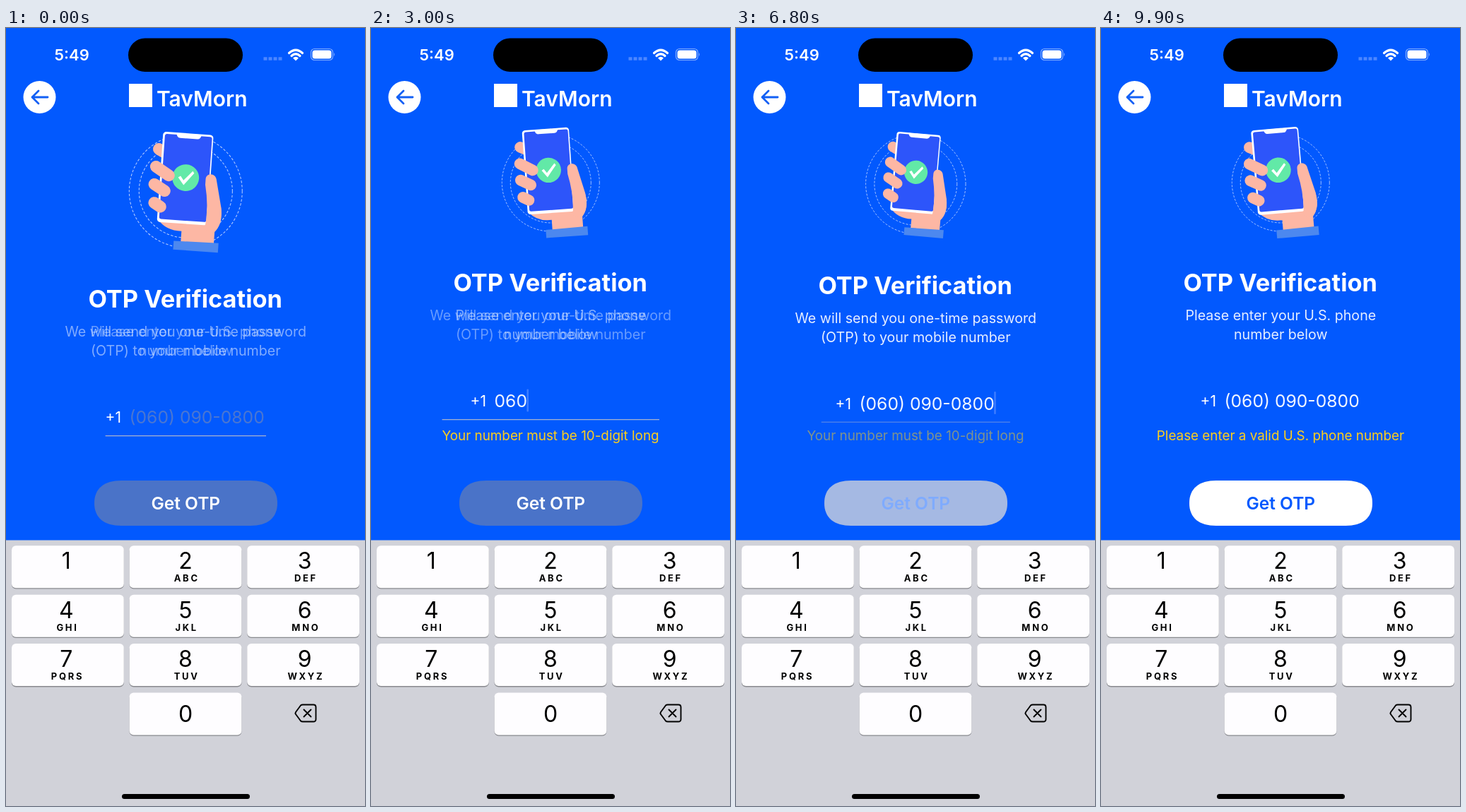
An HTML page for the animation above (10000 ms loop, 508 px wide and 1102 px high).

```html
<!DOCTYPE html>
<html lang="en">
<head>
<meta charset="utf-8">
<title>OTP Verification</title>
<style>
  html, body { margin: 0; width: 100%; height: 100%; overflow: hidden; background: #0259fe; }
  svg { display: block; width: 100%; height: 100%; font-family: Inter, Roboto, sans-serif; fill: #fff; }
  .mid { text-anchor: middle; }
  .semi { font-weight: 600; }
  .desc { font-size: 19.65px; fill: #e6eeff; }
  .err { font-size: 18.85px; fill: #ffcf1a; }
  .skin { fill: none; stroke: #fdb7a4; stroke-linecap: round; }
  .line { fill: none; stroke-linecap: round; stroke-linejoin: round; }
  .ring { fill: none; stroke: #b4ccff; stroke-width: .9; stroke-dasharray: 3 2; }
  #keys { fill: #000; }
</style>
</head>
<body>
<svg viewBox="0 0 508 1102">
  <defs>
    <path id="pill" d="M125 673C125 652 139 641 163 641H346C370 641 384 652 384 673S370 705 346 705H163C139 705 125 694 125 673Z"/>
  </defs>
  <rect width="508" height="1102" fill="#0259fe"/>

  <!-- status bar -->
  <text class="semi" x="68.500" y="46" font-size="22">5:49</text>
  <rect x="173" y="14.500" width="162" height="47.500" rx="23.700" fill="#000"/>
  <path d="M364.500 43.500h26" stroke="#4d87ff" stroke-width="4.500" stroke-dasharray="5 2"/>
  <path class="line" d="M400.500 35.500Q410 27 419.500 35.500M404 39.500Q410 34 416 39.500" stroke="#fff" stroke-width="3.200"/>
  <path d="M406 42.500Q410 39 414 42.500L410 46.500Z"/>
  <rect x="431.500" y="29.500" width="31" height="16" rx="5" fill="none" stroke="#80abff" stroke-width="1.200"/>
  <rect x="433.500" y="31.500" width="27" height="12" rx="3.500"/>
  <path d="M464 35q2 2.500 0 5z" fill="#80abff"/>

  <!-- header -->
  <circle cx="47.500" cy="98" r="23"/>
  <path class="line" d="M59 98H37M46 89L37 98L46 107" stroke="#1260f5" stroke-width="2.800"/>
  <rect x="174" y="79" width="33" height="33"/>
  <text class="semi" x="213" y="111" font-size="30">TavMorn</text>

  <!-- illustration, drawn around the ring centre -->
  <g id="art">
    <circle class="ring" r="69"/>
    <circle class="ring" r="57"/>
    <g id="hand">
      <path class="skin" d="M-38 -51L-20 -42" stroke-width="15"/>
      <path d="M-33 38Q-22 52 -2 51V66H40V49Q50 38 46 18L30 -10Z" fill="#fdb7a4"/>
      <rect x="-34" y="-73.500" width="64" height="115" rx="4"/>
      <rect x="-31.500" y="-71" width="60" height="108.500" rx="2.500" fill="#2d55fa"/>
      <path d="M-17 -73h32q-1 6-5 6h-22q-4 0-5-6z"/>
      <circle cx="-1.500" cy="-17" r="17" fill="#62e9a7"/>
      <path d="M-11 -17L-3.500 -7.500L9 -23.500L7 -26L-4 -13.500L-8 -19Z"/>
      <path d="M24 -17C24 -26 37 -26 38 -16L46 17Q50 40 38 51L27 47Q31 20 24 -10Z" fill="#fdb7a4"/>
      <path class="skin" d="M-40 -28.500L-23 -18.500M-40.500 -6L-27 1.500M-39 17.500L-31 22" stroke-width="15"/>
      <path d="M-11 64L46 63V75H-11Z" fill="#4c88ef"/>
    </g>
  </g>

  <g id="body">
    <text class="mid" x="253.700" y="373" font-size="34.400" font-weight="700">OTP Verification</text>
    <g id="descA" class="mid desc"><text x="254.300" y="414">We will send you one-time password</text><text x="254.300" y="441">(OTP) to your mobile number</text></g>
    <g id="descB" class="mid desc"><text x="254.300" y="414">Please enter your U.S. phone</text><text x="254.300" y="441">number below</text></g>
    <text x="140.500" y="536" font-size="21">+1</text>
    <text id="number" x="174.500" y="537" font-size="24.700"></text>
    <rect id="caret" y="511.500" width="2.500" height="32" rx="1" fill="#3f7dff"/>
    <rect id="rule" y="554" height="1.300" fill="#a3afd0"/>
  </g>
  <text id="errA" class="mid err" x="254" y="584">Your number must be 10-digit long</text>
  <text id="errB" class="mid err" x="254" y="584">Please enter a valid U.S. phone number</text>

  <!-- button -->
  <g class="mid semi" font-size="24.500">
    <use href="#pill" fill="#4a73c8"/>
    <text x="254.300" y="682">Get OTP</text>
    <g id="ready">
      <use href="#pill"/>
      <text x="254.300" y="682" fill="#0259fe">Get OTP</text>
    </g>
  </g>

  <!-- keypad -->
  <rect y="725.500" width="508" height="376.500" fill="#d1d2d9"/>
  <g id="keys" class="mid"></g>
  <path class="line" d="M420 958.500H435Q438.500 958.500 438.500 962V979Q438.500 982.500 435 982.500H420Q418 982.500 417 981.500L410 972Q409 970.500 410 969L417 959.500Q418 958.500 420 958.500ZM421.500 965.500L431.500 975.500M431.500 965.500L421.500 975.500" stroke="#000" stroke-width="1.900"/>
  <rect x="164" y="1085" width="181" height="7" rx="3.500" fill="#000"/>
</svg>
<script>
const LOOP = 10000;
const DIGITS = "0600900800";
const PRESSES = [850, 1700, 2550, 3150, 3750, 4600, 5330, 5750, 6130, 6480];
const START = PRESSES[0], FULL = 6580, SUBMIT = 8100;   // moments when the form changes state
const MOVE = 650, FADE = 440;

const $ = id => document.getElementById(id);
const set = (id, attrs) => { for (const k in attrs) $(id).setAttribute(k, attrs[k]); };
const clamp = x => Math.max(0, Math.min(1, x));
const mix = (a, b, k) => a + (b - a) * k;
const ease = x => x < .5 ? 4 * x ** 3 : 1 - (2 - 2 * x) ** 3 / 2;
const ramp = (t, start, length) => clamp((t - start) / length);

const letters = ["", "ABC", "DEF", "GHI", "JKL", "MNO", "PQRS", "TUV", "WXYZ"];
function key(label, sub, col, row) {
  const x = 8 + col * 166.6, y = 733.3 + row * 69.4;
  const cx = 254 + (col - 1) * 168.7;
  const base = label === "0" ? 48.5 - 7 : 33;
  return `<rect x="${x}" y="${y + 1.3}" width="158.800" height="60" rx="6" fill="#88898e"/>
    <rect id="key${label}" x="${x}" y="${y}" width="158.800" height="60" rx="6" fill="#fefdff"/>
    <text x="${cx}" y="${y + base}" font-size="32">${label}</text>
    <text x="${cx + 1.7}" y="${y + 51}" font-size="13" font-weight="700" letter-spacing="2.700">${sub}</text>`;
}
$("keys").innerHTML = letters.map((s, i) => key(String(i + 1), s, i % 3, Math.floor(i / 3))).join("") + key("0", "", 1, 3);

function format(d) {
  if (d.length < 4) return d;
  if (d.length < 8) return d.slice(0, 3) + "-" + d.slice(3);
  return `(${d.slice(0, 3)}) ${d.slice(3, 6)}-${d.slice(6)}`;
}

function draw(t) {
  // 0 = roomy layout, 1 = raised to make space for the error
  const shift = length => ramp(t, START, length) - ramp(t, FULL, length) + ramp(t, SUBMIT, length);
  const raised = ease(shift(MOVE));
  const shown = shift(FADE);
  set("body", { transform: `translate(0 ${mix(23, 0, raised)})` });
  set("art", { transform: `translate(254.300 ${mix(231, 219, raised)}) scale(${mix(1.159, 1, raised)})` });

  // the hand grows a little as it leans to the left
  const tilt = 5.1 * Math.cos((t - 630) / 6000 * 2 * Math.PI);
  set("hand", { transform: `translate(0 3) rotate(${tilt}) scale(${1 - .0095 * tilt}) translate(0 -3)` });

  // the two hints swap every three seconds
  const phase = (t + 220) % 6000;
  const hint = ramp(phase, 0, 400) - ramp(phase, 3000, 400);
  set("descA", { opacity: hint });
  set("descB", { opacity: 1 - hint });

  const typed = PRESSES.filter(p => p <= t).length;
  const text = $("number");
  text.textContent = format(typed ? DIGITS.slice(0, typed) : DIGITS);
  text.setAttribute("fill", typed ? "#f2f6ff" : "#4a76d2");
  const last = typed ? PRESSES[typed - 1] : -700;
  const editing = t < SUBMIT;
  set("caret", {
    x: 174 + (typed ? text.getComputedTextLength() : 0),
    opacity: editing && (t - last) % 1000 < 600 ? 1 : 0
  });
  const done = ramp(t, FULL, FADE);
  const half = mix(113.7, 153.7, shown);
  set("rule", { x: 254.3 - half, width: 2 * half, opacity: 1 - done });
  set("key0", { fill: t - last < 110 ? "#b5c1cf" : "#fefdff" });

  set("errA", { opacity: editing ? shown : 0 });
  set("errB", { opacity: editing ? 0 : shown });
  set("ready", { opacity: done });
}

const begin = performance.now();
function tick() {
  draw((performance.now() - begin) % LOOP);
  requestAnimationFrame(tick);
}
draw(0);
requestAnimationFrame(tick);
</script>
</body>
</html>
```
